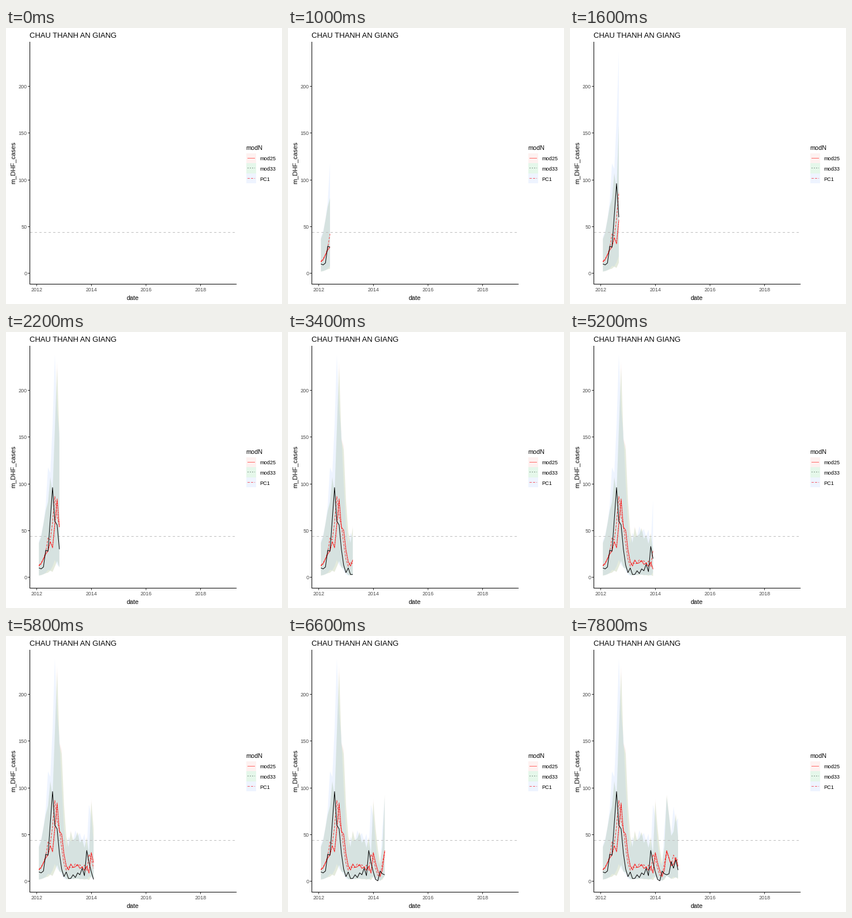
A matplotlib script that plays this animation: 480x480 px, repeating every 8 s.

```python
import matplotlib.pyplot as plt
import numpy as np
from matplotlib.animation import FuncAnimation
from matplotlib.patches import Polygon, Rectangle

SIZE, DPI = 480, 100
PX = 72 / DPI                      # one pixel in points
FRAMES, INTERVAL = 40, 200
plt.rcParams["font.family"] = "Liberation Sans"

# monthly case counts, first month is February 2012
cases = np.array([10, 9, 11, 29, 28, 62, 96, 60, 56, 30, 13, 5, 10, 3, 3, 7, 4,
                  9, 7, 14, 6, 33, 20, 10, 2, 0.5, 11, 8, 7, 8, 21, 14, 23, 12])
months = np.arange(len(cases))
keys = np.floor(months * 99 / 83 + 0.5)      # frame at which each month appears


def bump(centre, width, height):
    return height * np.exp(-0.5 * ((months - centre) / width) ** 2)


season = bump(3.7, 1.5, 16) + bump(16, 2.5, 10) + bump(28.2, 0.9, 21) + bump(31, 1, 8)


def forecast(lag, gain):
    """Models follow the counts some months late, on top of a seasonal rise."""
    return 3 + gain * np.interp(months - lag, months, cases) + season


def upper(mean):
    return 2.7 * mean + 4


def lower(mean):
    return 0.1 * mean ** 1.17


def px(m):
    return 57.2 + 3.9625 * np.asarray(m)


def py(v):
    return 426.6 - 1.626 * np.asarray(v)


fig = plt.figure(figsize=(SIZE / DPI, SIZE / DPI), dpi=DPI, facecolor="white")
ax = fig.add_axes([0, 0, 1, 1])
ax.set_xlim(0, SIZE)
ax.set_ylim(SIZE, 0)
ax.axis("off")


def line(xs, ys, color, dash="-", z=3):
    return ax.plot(xs, ys, color=color, lw=PX, ls=dash, snap=False, zorder=z,
                   solid_capstyle="butt", dash_capstyle="butt")[0]


def text(x, y, s, size, color="black", **kw):
    ax.text(x, y, s, fontsize=size * PX, color=color, **kw)


# axes
line([41.5, 41.5], [24, 446], "black", z=6)
line([41, 401], [445.5, 445.5], "black", z=6)
for v in range(0, 201, 50):
    y = np.floor(py(v)) + 0.5
    line([38, 41], [y, y], "#333333")
    text(36.5, y + 3.2, str(v), 9, "#4d4d4d", ha="right")
for i in range(4):
    x = 53.5 + 95 * i
    line([x, x], [446, 449], "#333333")
    text(x, 458.5, str(2012 + 2 * i), 9, "#4d4d4d", ha="center")
text(41, 17, "CHAU THANH AN GIANG", 13)
text(220.5, 473, "date", 11, ha="center")
text(12, 234, "m_DHF_cases", 11.1, rotation=90, ha="center", va="center")
line([42, 400], [355.5, 355.5], "#bebebe", (0, (4, 4)), z=2.5)

# models: name, mean, fill, dash, legend line colour
models = [
    ("mod25", forecast(2, 0.84), "#F8766D", "-", "#ff6a68"),
    ("mod33", forecast(1.95, 0.83), "#00BA38", (0, (2, 2)), "#7f9488"),
    ("PC1", forecast(1.2, 0.92), "#619CFF", (0, (4, 2)), "#f3616c"),
]
text(417.5, 212, "modN", 10.8)
ribbons, lines = [], []
for i, (name, _, fill, dash, key) in enumerate(models):
    y = 218 + 17.3 * i
    ax.add_patch(Rectangle((418, y), 17, 17.3, fc=fill, alpha=0.1, lw=0))
    mid = np.floor(y + 8.6) + 0.5
    line([420, 433], [mid, mid], key, dash)
    text(441, mid + 4, name, 9.1)
    ribbons.append(ax.add_patch(Polygon(np.zeros((3, 2)), fc=fill, alpha=0.1, lw=0, zorder=2)))
    lines.append(line([], [], (1, 0, 0, 0.7), dash, z=4))
case_line = line([], [], "black", z=5)


def update(frame):
    now = np.interp(frame, keys, months)
    ms = np.unique(np.append(months[months < now], now))
    xs = px(ms)

    def at(values):
        return py(np.interp(ms, months, values))

    for ribbon, ln, (_, mean, *_style) in zip(ribbons, lines, models):
        top, bottom = at(upper(mean)), at(lower(mean))
        ribbon.set_xy(np.column_stack([np.r_[xs, xs[::-1]], np.r_[top, bottom[::-1]]]))
        ln.set_data(xs, at(mean))
    case_line.set_data(xs, at(cases))
    artists = [*ribbons, *lines, case_line]
    for artist in artists:
        artist.set_visible(frame > 0)
    return artists


anim = FuncAnimation(fig, update, frames=FRAMES, interval=INTERVAL, repeat=True,
                     repeat_delay=0, blit=False)
plt.show()
```
